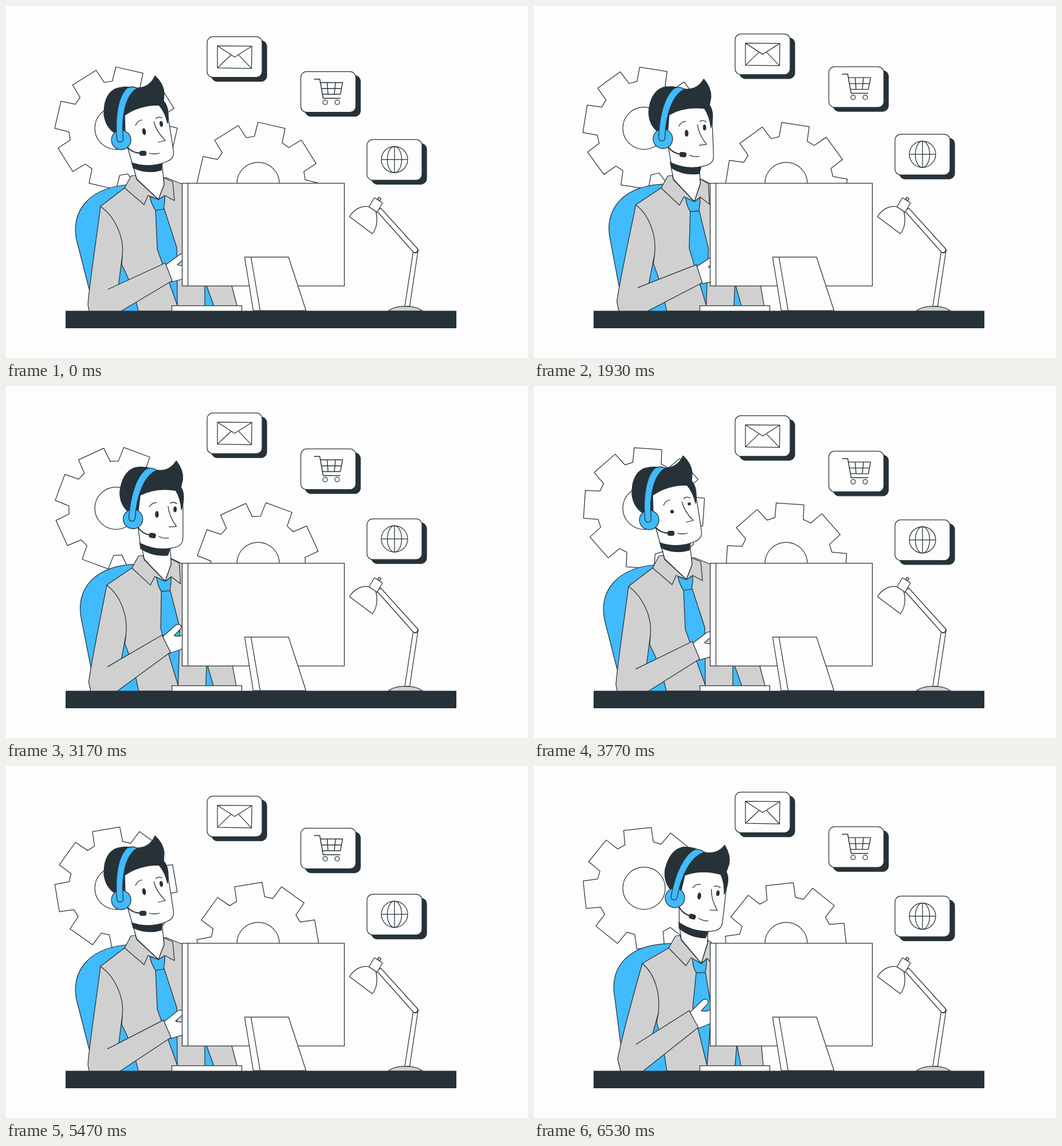
An HTML page with a canvas that plays this animation: 911 px wide and 615 px high, repeating every 6560 ms.

```html
<!DOCTYPE html>
<html lang="en">
<head>
<meta charset="utf-8">
<title>Support desk</title>
<style>
  html, body { margin: 0; width: 100%; height: 100%; overflow: hidden; background: #fdfdfd; }
  canvas { display: block; }
</style>
</head>
<body>
<canvas id="stage" width="911" height="615"></canvas>
<script>
const ctx = document.getElementById('stage').getContext('2d');
const LOOP = 6560, CYCLE = 4000;
const INK = '#263238', PAPER = '#fdfdfd', BLUE = '#40bbfd', GREY = '#d0d0d0';
const rad = Math.PI / 180;

// Piecewise linear curve through [time, value] pairs.
function track(keys, t) {
  let i = 1;
  while (i < keys.length - 1 && t > keys[i][0]) i++;
  const [t0, a] = keys[i - 1], [t1, b] = keys[i];
  return a + (b - a) * (t - t0) / (t1 - t0);
}

function smooth(x) {
  x = Math.max(0, Math.min(1, x));
  return x * x * (3 - 2 * x);
}

// Thirty pictures a second, on 10 ms ticks: 0, 30, 70, 100...
function held(t) {
  const r = t % 100;
  return t - r + (r < 30 ? 0 : r < 70 ? 30 : 70);
}

function shape(path, fill, stroke = INK, width = 1.25) {
  const p = typeof path === 'string' ? new Path2D(path) : path;
  if (fill) { ctx.fillStyle = fill; ctx.fill(p); }
  if (stroke) { ctx.strokeStyle = stroke; ctx.lineWidth = width; ctx.stroke(p); }
}

// Blend two path strings that share the same commands.
function morph(a, b, k) {
  const to = b.split(' ');
  return a.split(' ').map((s, i) => isNaN(s) ? s : +s + (to[i] - s) * k).join(' ');
}

function oval(x, y, rx, ry, fill, stroke = INK, turn = 0) {
  const p = new Path2D();
  p.ellipse(x, y, rx, ry, turn, 0, 2 * Math.PI);
  shape(p, fill, stroke);
}

function box(x, y, w, h, r, fill, stroke = INK) {
  const p = new Path2D();
  p.roundRect(x, y, w, h, r);
  shape(p, fill, stroke);
}

const spin = [[0, -77], [870, -39.2], [1930, 9], [2570, 37], [3770, 93.8], [5470, 170.5], [6560, 220.1]];
const wave = [[0, 0], [260, 7.5], [500, 15.2], [870, 15.6], [1170, 9], [1470, 2.6], [1770, 1.4], [1930, 0.8], [2000, 0]];
const blink = [[0, 1], [3660, 1], [3800, 0.4], [3930, 1], [4000, 1]];

const lean = p => smooth((p - 1555) / 720) - smooth((p - 2800) / 700);
const bob = (t, mid, amp, peak) => mid + amp * Math.cos(2 * Math.PI * (t - peak) / CYCLE);

function gear(x, y, angle) {
  const p = new Path2D();
  const corners = [[-17.5, 82.5], [-13.1, 107], [13.1, 107], [17.5, 82.5]];
  for (let i = 0; i < 8; i++) {
    for (const [d, r] of corners) {
      const a = (angle + 45 * i + d) * rad;
      p.lineTo(x + r * Math.cos(a), y + r * Math.sin(a));
    }
  }
  p.closePath();
  shape(p, PAPER);
  oval(x, y, 37, 37, PAPER);
}

function card(x, y, icon) {
  ctx.save();
  ctx.translate(x + 0.5, y);
  box(8, 7, 96, 71, 10, INK);
  box(0, 0, 96, 71, 10, PAPER);
  icon();
  ctx.restore();
}

function mail() {
  shape('M18 16 L78 16.5 L77.5 55.5 L18 54.5 Z');
  shape('M18 16 L48 35.5 L78 16.5 M18 54.5 L41.5 32 M77.5 55.5 L55 32');
}

function cart() {
  shape('M23 13 L33 13 L39 46.5 L69 46.5', null, INK, 1.5);
  shape('M34 19 L73 19 L69 39.5 L37.5 39.5 M36 29.5 L71 29.5 M46 19 L47.5 39.5 M60.5 19 L58.5 39.5', null, INK, 1.4);
  oval(42.5, 53.5, 4, 4);
  oval(63.5, 53.5, 4, 4);
}

function globe() {
  oval(48, 35, 23, 23);
  oval(48, 35, 12.5, 23);
  shape('M25 35 H71 M48 12 V58');
}

function chairAndTorso(k) {
  const m = (a, b, fill, stroke) => shape(morph(a, b, k), fill, stroke);
  // Chair back and the parts seen beside the torso
  m('M 147 502 L 124 412 C 111 362 142 314 222 312 L 222 360 L 245 540 L 160 540 Z',
    'M 152 492 L 141 405 C 131 350 165 308 250 310 L 250 360 L 245 540 L 160 540 Z', BLUE);
  // Torso
  m('M 165 350 L 208 317 L 218 304 L 280 300 L 307 311 L 330 320 L 394 489 L 403 523 L 403 533 L 231 533 Q 222 490 202 452 L 203 436 Z',
    'M 189 345 L 235 318 L 247 304 L 300 304 L 310 311 L 330 320 L 397 489 L 400 523 L 400 533 L 232 533 Q 226 490 214 448 L 217 432 Z', GREY);
  m('M 347 480 L 347 533 L 366 533 Z', 'M 354 487 L 350 533 L 363 533 Z', BLUE);
  // Tie
  m('M 261 356 L 264 425 L 299 523 L 298 422 L 276 354 Z',
    'M 283 361 L 277 422 L 302 523 L 310 425 L 299 360 Z', BLUE);
  m('M 251 333 L 266 338 L 277 331 L 277 342 L 275 355 L 261 357 Q 254 347 251 333 Z',
    'M 276 335 L 292 345 L 301 337 L 301 347 L 299 361 L 283 361 Q 277 351 276 335 Z', BLUE);
  // Upper arm
  m('M 165 350 C 156 420 145 490 143 522 L 146 537 L 190 537 L 197 483 L 203 436 C 207 404 190 368 165 350 Z',
    'M 189 345 C 172 405 153 475 146 512 L 152 537 L 190 537 L 207 468 L 217 432 C 221 400 212 364 189 345 Z', GREY);
}

function forearm(k, turn) {
  ctx.save();
  ctx.translate(164.5 + 3 * k, 519 - 7 * k);
  ctx.rotate(-turn * rad);
  ctx.translate(-164.5, -519);
  shape('M279 452 L302 435 Q309 430 313 436 Q314 441 306 446 L299 452 Q311 456 315 451 Q319 442 336 435 L336 470 L289 482 Z', PAPER);
  shape('M178 495 L278 449 L290 480 L181 545 L152 545 L150 510 Z', GREY, null);
  shape('M178 495 L278 449 L290 480 L181 545');
  ctx.restore();
}

function neckAndCollar(k) {
  const m = (a, b, fill) => shape(morph(a, b, k), fill);
  m('M 220 272 L 228 302 L 266 338 L 276 312 L 272 275 Z',
    'M 253 273 L 257 303 L 292 345 L 303 309 L 303 285 Z', PAPER);
  m('M 218 297 L 207 318 L 241 347 L 248 331 L 266 338 L 228 303 L 226 296 Z',
    'M 247 297 L 235 318 L 265 349 L 274 335 L 292 345 L 257 304 L 255 296 Z', GREY);
  m('M 275 300 L 291 307 L 294 340 L 277 331 L 266 338 L 276 312 Z',
    'M 303 304 L 316 313 L 317 352 L 302 336 L 292 345 L 303 310 Z', GREY);
}

function head(k, tilt, open) {
  ctx.save();
  ctx.translate(201 + 45 * k, 234 - 3.5 * k);
  ctx.rotate(15.6 * tilt * rad);
  ctx.translate(-201, -234);
  // Chin shadow and face
  shape('M219 272 L222 283 Q246 294 271 287 L273 274 Z', INK);
  shape('M200 195 L206 235 L213 250 L220 274 Q252 284 280 272 Q293 267 292.5 256 L290 238 L282 188 L260 165 L215 170 Z', PAPER);
  // Hair
  shape('M207 191 L208 222 Q198 226 190 222 Q174 212 171 190 Q170 156 190 145 Q206 139 224 143 Q250 145 260 122 Q275 136 276 152 L275 166 Q286 178 282 205 Q278 186 267 173 Q232 173 207 191 Z', INK);
  // Features
  oval(241, 219.5, 3.2, 6 * open, INK, null, -0.15);
  oval(271, 206, 2.9, 5 * open, INK, null, -0.15);
  shape('M226 209 Q229 200 238 199 M261 197 Q266 192 273 196');
  shape('M258 202 Q262 219 278 235 L265 238');
  shape('M250 257 Q259 260 268 257');
  // Headset
  oval(201, 234, 17, 17, BLUE);
  shape('M193.5 232 C190 192 196 158 211 143.5 Q220 139 229 143.5 C208 156 201 194 204.5 233 Q204 238 199 238 Q194 238 193.5 232 Z', BLUE);
  shape('M212 247 Q221 257 235 257', null, INK, 2);
  box(233.5, 253.5, 11, 7.5, 3, INK);
  ctx.restore();
}

function desk() {
  box(307.5, 309.5, 283, 179.5, 0, PAPER);
  shape('M317.5 309.5 V489');
  shape('M416.5 438.5 H493 L523.5 532 H431.5 Z', PAPER);
  shape('M427.5 438.5 L443.5 532');
  box(289.5, 523.5, 122, 10, 0, PAPER);
}

function lamp() {
  shape('M667 533 Q676 524.5 697 524.5 Q718 524.5 727 533 Z', GREY);
  shape('M711 427 L696 524.5 H704.5 L719 428 Z', PAPER);
  oval(715, 427, 4.5, 4.5, PAPER);
  shape('M647 358 L711 430 Q717 433 719 425 L654 353 Z', PAPER);
  shape('M648.5 338 L650.5 334 L654.5 336.5 L652 341 Z', GREY);
  shape('M643 335 L657 344 L647.5 360.5 L633.5 351 Z', PAPER);
  shape('M599.5 368 C608 354 622 348 633.5 351 L645.5 359 C649 374 647 388 639.5 398 Z', PAPER);
}

function draw(t) {
  const p = t % CYCLE;
  const k = lean(p);
  const angle = track(spin, t);
  ctx.fillStyle = PAPER;
  ctx.fillRect(0, 0, 911, 615);
  ctx.lineJoin = 'round';

  gear(192, 213.5, angle);
  gear(440, 310, angle);
  card(350.5, bob(t, 51, 5.4, 670), mail);
  card(514, bob(t, 110.3, 4.7, 220), cart);
  card(629.5, bob(t, 228.8, 5, -300), globe);

  chairAndTorso(k);
  forearm(k, track(wave, p % 2000) - 7.6 * k);
  neckAndCollar(k);
  head(k, lean(p - 53), track(blink, p));

  desk();
  lamp();
  ctx.fillStyle = INK;
  ctx.fillRect(104, 532.5, 682, 30.5);
}

const start = performance.now();
function tick(now) {
  draw(held(Math.max(0, now - start) % LOOP));
  requestAnimationFrame(tick);
}
draw(0);
requestAnimationFrame(tick);
</script>
</body>
</html>
```
